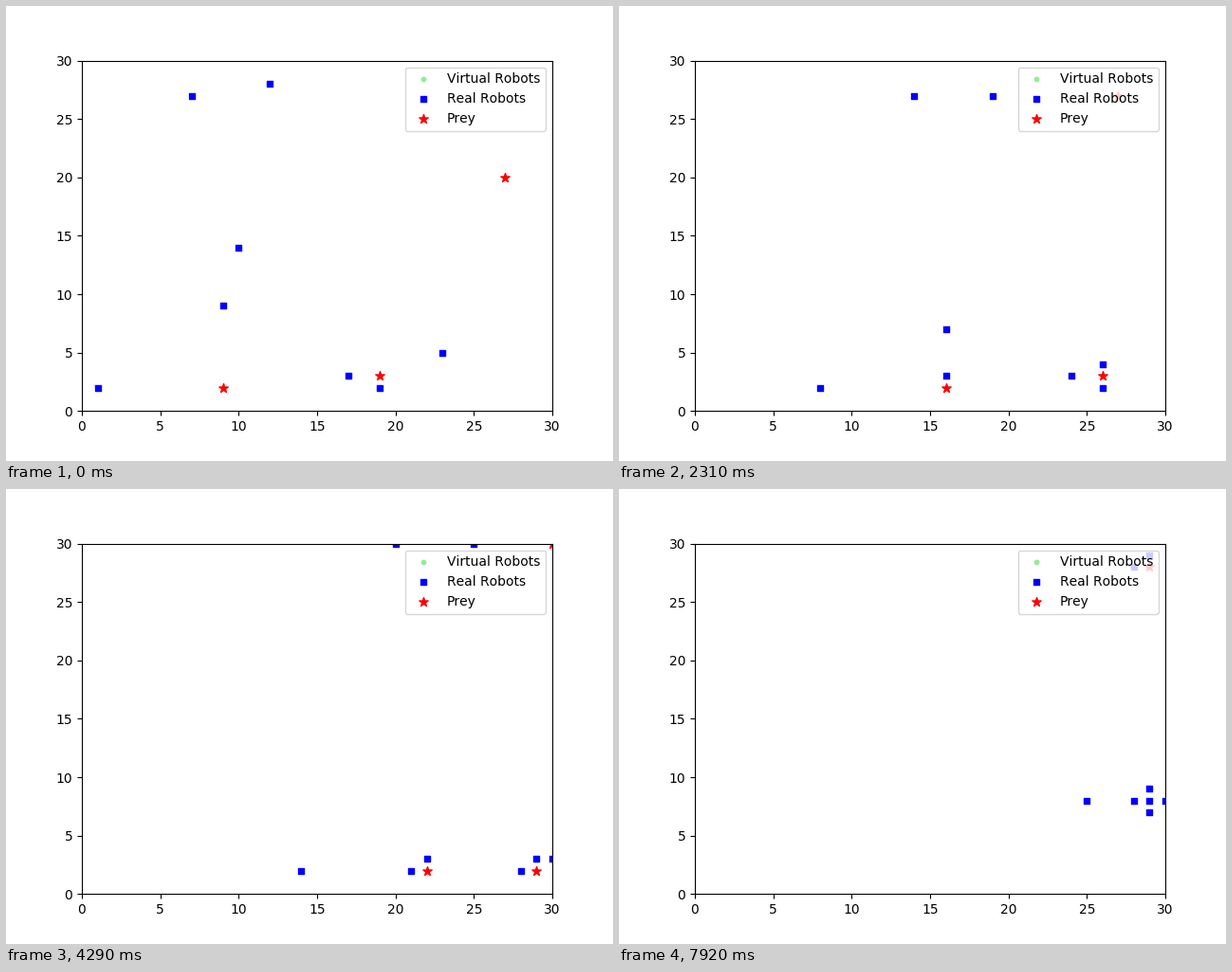
A matplotlib script for the animation above (8000 ms loop, 640 by 480 pixels).

```python
import numpy as np
import matplotlib.pyplot as plt
from matplotlib.animation import FuncAnimation

LOOP, TICK, STEP = 8000, 20, 330
STEPS = LOOP // STEP + 1
SIZE = 30
HEADING = {"U": (0, 1), "D": (0, -1), "L": (-1, 0), "R": (1, 0)}


def run(x, y, legs):
    """Cells a prey visits; it is caught at the last one."""
    path = [(x, y)]
    for leg in legs.split():
        dx, dy = HEADING[leg[0]]
        for _ in range(int(leg[1:])):
            x, y = x + dx, y + dy
            path.append((x, y))
    return path


south = run(9, 2, "R18")
east = run(19, 3, "R11 L1 D3")
north = run(27, 20, "U10 R3 D4 U4 L1 D2")
PREY = [south, east, north]
trap = north[-1:] * STEPS  # latecomers cut the last prey off here


def chase(pos, path, slot, k):
    """One king's move toward a slot beside the prey."""
    prey, last = path[k], path[k - 1]
    head = (prey[0] - last[0], prey[1] - last[1])
    if slot == head and head[1]:  # keep out of a climbing or diving prey's way
        slot = (1, -slot[1])
    goal = np.clip(np.add(prey, slot), 0, SIZE)
    new = tuple(np.add(pos, np.sign(goal - pos)))
    return last if new == prey else new


def hunt(start, targets, slots):
    """Robot cells at every step, taking on the targets one after another."""
    cells = [start]
    for k in range(1, STEPS):
        path, slot = next((p, s) for p, s in zip(targets, slots) if k < len(p))
        cells.append(chase(cells[-1], path, slot, k))
    return cells


# Each pack: its targets in order, then each robot's start and its slots.
PACKS = [
    ([north], {(7, 27): [(-1, 0)],
               (12, 28): [(0, 0)]}),
    ([south, trap], {(10, 14): [(0, 0), (-1, 0)],
                     (9, 9): [(0, 1), (0, 0)],
                     (1, 2): [(-1, 0), (0, 0)]}),
    ([east, south, trap], {(17, 3): [(-1, 0), (2, -1), (0, 0)],
                           (19, 2): [(0, -1), (3, 0), (1, 0)],
                           (23, 5): [(0, 1), (2, 0), (0, 0)]}),
]
ROBOTS = [hunt(start, targets, slots)
          for targets, pack in PACKS for start, slots in pack.items()]

plt.rcParams["text.kerning_factor"] = 6
fig, ax = plt.subplots(figsize=(6.4, 4.8), dpi=100)
ax.set_xlim(0, SIZE)
ax.set_ylim(0, SIZE)
ax.scatter([], [], s=10, c="lightgreen", marker="o", label="Virtual Robots")
robots = ax.scatter([], [], s=20, c="blue", marker="s", label="Real Robots")
prey = ax.scatter([], [], s=50, c="red", marker="*", label="Prey")
ax.legend(loc="upper right")


def update(i):
    k = int((i + 0.5) * TICK // STEP)
    robots.set_offsets([path[k] for path in ROBOTS])
    prey.set_offsets([path[k] for path in PREY if k < len(path)])
    return robots, prey


anim = FuncAnimation(fig, update, frames=LOOP // TICK, interval=TICK,
                     repeat=True, repeat_delay=0, blit=False)
plt.show()
```
